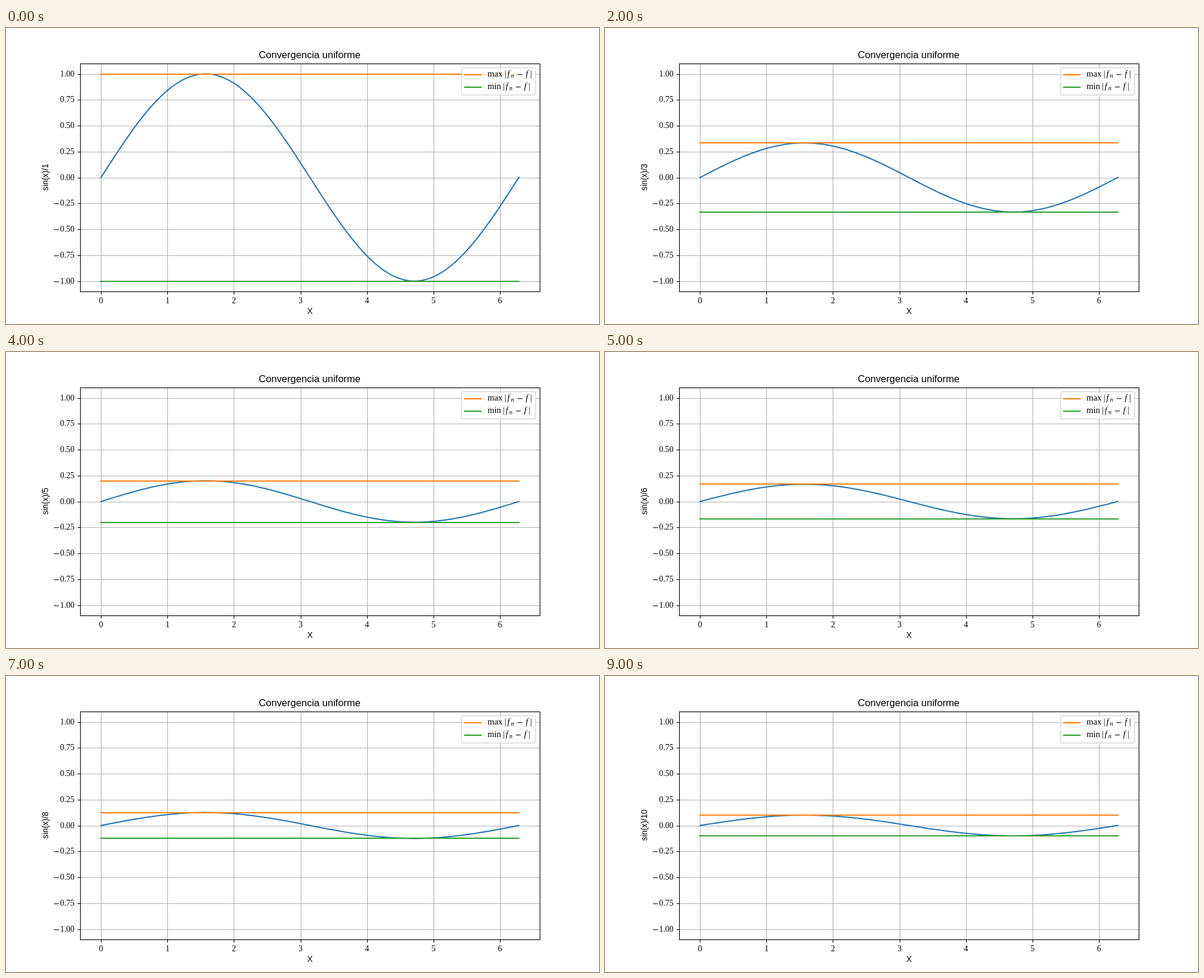
Animation of 1000 by 500 pixels, one loop 10 s. Source, as an HTML page with a canvas:

```html
<!DOCTYPE html>
<html lang="es">
<head>
<meta charset="utf-8">
<title>Convergencia uniforme</title>
<style>
  html, body { margin: 0; overflow: hidden; background: #fff; }
  canvas { display: block; }
</style>
</head>
<body>
<canvas id="plot" width="1000" height="500"></canvas>
<script>
const ctx = document.getElementById('plot').getContext('2d');

const SANS = '"Liberation Sans", Arial, sans-serif';
const SERIF = '"Liberation Serif", "Times New Roman", serif';
const BLUE = '#1f77b4', ORANGE = '#ff7f0e', GREEN = '#2ca02c';
const LEFT = 125, RIGHT = 900, TOP = 60, BOTTOM = 445;
const THIN = 1.11, THICK = 2.08;
const STEP_MS = 1000, STEPS = 10;

const px = x => 160.227 + x * 704.545 / (2 * Math.PI);
const py = y => 252.5 - 175 * y;
const crisp = v => Math.floor(v + 0.5) + 0.5;

function line(x1, y1, x2, y2, color, width, cap = 'butt') {
  ctx.strokeStyle = color;
  ctx.lineWidth = width;
  ctx.lineCap = cap;
  ctx.beginPath();
  ctx.moveTo(x1, y1);
  ctx.lineTo(x2, y2);
  ctx.stroke();
}

function text(str, x, y, font, align = 'left') {
  ctx.fillStyle = '#000';
  ctx.font = font;
  ctx.textAlign = align;
  ctx.fillText(str, x, y);
}

const minus = (x, y) => text('−', x, y, '13px "DejaVu Sans", sans-serif');

function drawAxes() {
  for (let i = 0; i <= 6; i++) {
    const x = crisp(px(i));
    line(x, TOP, x, BOTTOM, '#b0b0b0', THIN);
    line(x, BOTTOM, x, BOTTOM + 5.4, '#000', THIN);
    text(i, px(i), 465, `13.9px ${SERIF}`, 'center');
  }
  for (let v = -1; v <= 1; v += 0.25) {
    const y = crisp(py(v)), base = Math.round(py(v) + 4);
    line(LEFT, y, RIGHT, y, '#b0b0b0', THIN);
    line(LEFT - 4.4, y, LEFT, y, '#000', THIN);
    text(Math.abs(v).toFixed(2), 115.5, base, `13.9px ${SERIF}`, 'right');
    if (v < 0) minus(79.8, base + 0.5);
  }
}

function drawSeries(n) {
  ctx.strokeStyle = BLUE;
  ctx.lineWidth = THICK;
  ctx.lineCap = 'square';
  ctx.lineJoin = 'round';
  ctx.beginPath();
  for (let i = 0; i < 100; i++) {
    const x = 2 * Math.PI * i / 99;
    ctx.lineTo(px(x), py(Math.sin(x) / n));
  }
  ctx.stroke();
  for (const [bound, color] of [[1 / n, ORANGE], [-1 / n, GREEN]]) {
    const y = Math.floor(py(bound) + 0.5);
    line(160, y, 865, y, color, THICK, 'square');
  }
}

function legendEntry(name, color, lineY, base, barX) {
  line(773.5, lineY, 801, lineY, color, THICK, 'square');
  const italic = `italic 14px ${SERIF}`;
  text(name, 812, base, `14.7px ${SERIF}`);
  for (const x of [barX, barX + 43.3]) {
    line(x, base - 10.3, x, base + 3.4, '#000', 0.7);
  }
  text('f', barX + 3.2, base, italic);
  text('n', barX + 9.2, base + 2, `italic 10.5px ${SERIF}`);
  minus(barX + 19.2, base + 0.5);
  text('f', barX + 34.3, base, italic);
}

function drawLegend() {
  ctx.globalAlpha = 0.8;
  ctx.fillStyle = '#fff';
  ctx.strokeStyle = '#ccc';
  ctx.lineWidth = 1.39;
  ctx.beginPath();
  ctx.roundRect(768.3, 67, 124.9, 46.3, 2.8);
  ctx.fill();
  ctx.stroke();
  ctx.globalAlpha = 1;
  legendEntry('max', ORANGE, 79, 82, 842.2);
  legendEntry('min', GREEN, 100, 103, 839.5);
}

function draw(n) {
  ctx.fillStyle = '#fff';
  ctx.fillRect(0, 0, 1000, 500);
  drawAxes();
  drawSeries(n);
  ctx.strokeStyle = '#000';
  ctx.lineWidth = THIN;
  ctx.lineJoin = 'miter';
  ctx.strokeRect(LEFT + 0.5, TOP + 0.5, RIGHT - LEFT, BOTTOM - TOP);
  text('Convergencia uniforme', 512, 51, `16.6px ${SANS}`, 'center');
  text('X', 512.5, 483, `13.84px ${SANS}`, 'center');
  ctx.save();
  ctx.translate(70.5, 252);
  ctx.rotate(-Math.PI / 2);
  text(`sin(x)/${n}`, 0, 0, `13.84px ${SANS}`, 'center');
  ctx.restore();
  drawLegend();
}

const start = performance.now();
function tick() {
  const elapsed = performance.now() - start;
  draw(Math.floor(elapsed / STEP_MS) % STEPS + 1);
  requestAnimationFrame(tick);
}
tick();
</script>
</body>
</html>
```
